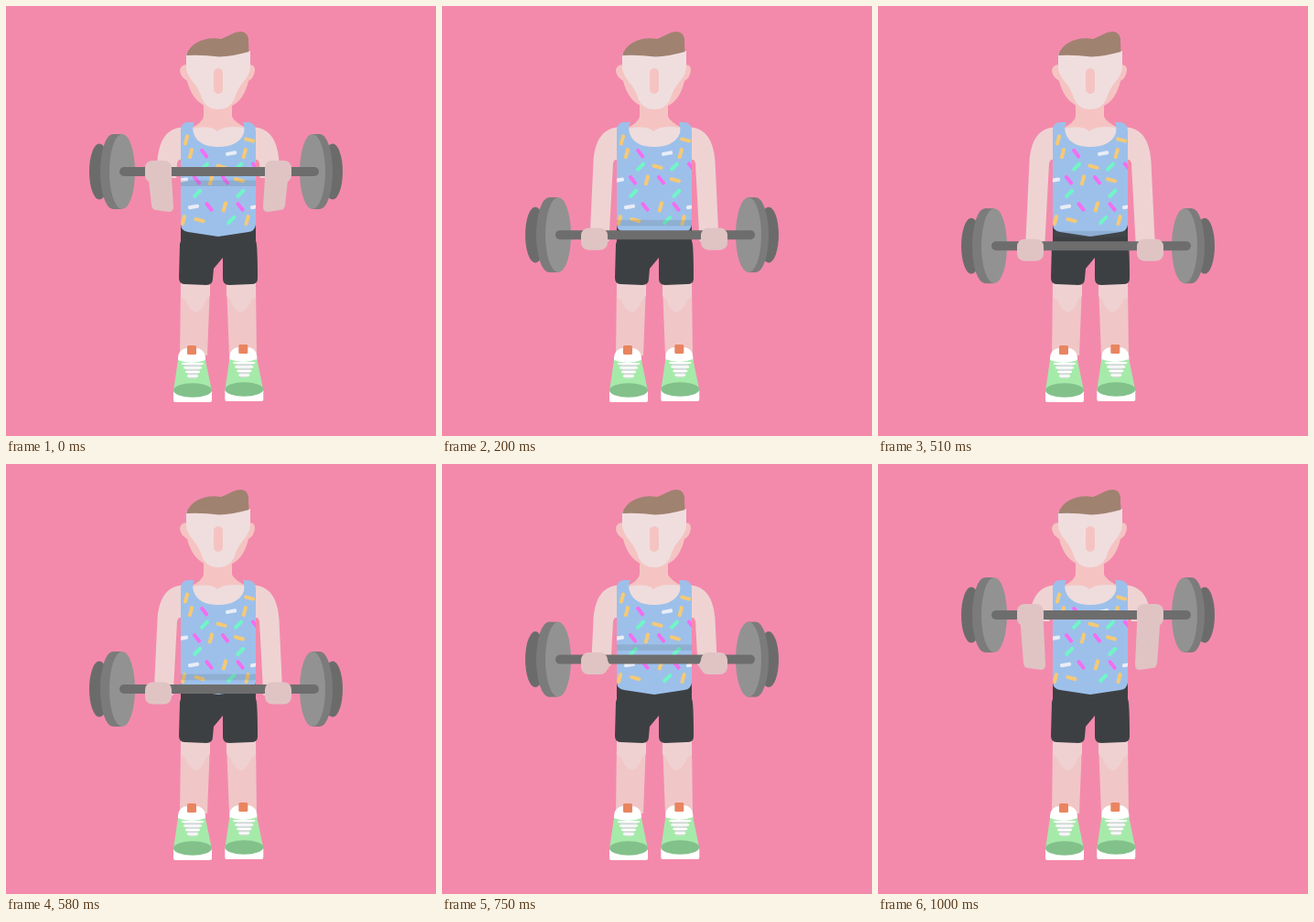
An HTML page for the animation above (1070 ms loop, 470 by 470 pixels).

```html
<!DOCTYPE html>
<html lang="en">
<head>
<meta charset="utf-8">
<title>Barbell curl</title>
<style>
html, body { margin: 0; width: 100%; height: 100%; overflow: hidden; background: #f38aac; }
svg { display: block; width: 100%; height: 100%; }
.mirror { transform: translateX(464px) scaleX(-1); }
</style>
</head>
<body>
<svg viewBox="0 0 470 470">
  <defs>
    <path id="shirt" d="M191 135Q192 127 199 127H206Q203 132 205 139Q210 154 232 154T260 139Q261 132 259 127H265Q273 128 273 137V239Q272 246 265 247L232 252L199 247Q191 246 191 238Z"/>
    <clipPath id="shirtClip"><use href="#shirt"/></clipPath>
    <clipPath id="armClip"><rect id="armRect" x="140" y="120" width="60"/></clipPath>
    <path id="upperArm" clip-path="url(#armClip)" fill="#efd3d3" d="M194 132.500C175 133 167 148 165.500 170L161 266H182L187 172Q188 168 190 168H194Z"/>
    <g id="grip">
      <path id="wrist" fill="#efd3d3" d="M161.500 260H182V276H155Q155 266 161 264Z"/>
      <path id="forearm" fill="#e0c4c4"/>
      <rect id="hand" fill="#e0c4c4"/>
    </g>
    <g id="leg">
      <path fill="#f1c6c7" d="M191 304H223L220 382H190Z"/>
      <path fill="#efd1d2" d="M191 302H223V317Q218 320 216 328Q207 342 198 326Q196 320 191 318Z"/>
    </g>
    <g id="shoe">
      <rect x="188" y="374" width="30" height="24" rx="10" fill="#fff"/>
      <rect x="198" y="371" width="10" height="10" rx="1.500" fill="#e88560"/>
      <path fill="#a6eaaa" d="M188 387Q203 393 218 387L225 421H183Z"/>
      <path fill="#d7dedb" d="M194 390H214L208 407H200Z"/>
      <g id="laces" stroke="#fff" stroke-width="2.200" stroke-linecap="round"></g>
      <rect x="183" y="420" width="42" height="13" rx="2" fill="#fff"/>
      <ellipse cx="204" cy="420" rx="21" ry="7.800" fill="#83c18b"/>
    </g>
    <path id="sparks" fill="none" stroke="#6bffc5" stroke-width="6" stroke-linecap="round" d="M133 147L152 164.500M130 168L149.500 174.500M136 186L149 184.500"/>
  </defs>

  <rect width="470" height="470" fill="#f38aac"/>
  <use href="#leg"/>
  <use href="#leg" class="mirror"/>
  <use href="#shoe"/>
  <use href="#shoe" x="56.300" y="-1"/>
  <path fill="#3d4043" d="M191 238H273V257Q275 259 275 298Q275 304 268 304L244 305Q237 305 237 298V275L227 287L226 298Q226 305 219 305L195 304Q189 304 189 297L190 260L191 257Z"/>
  <use href="#upperArm"/>
  <use href="#upperArm" class="mirror"/>

  <g id="head">
    <path fill="#f5c4c2" d="M216 98H247V121Q250 127 262 133L255 150H210L203 133Q214 128 216 121Z"/>
    <path fill="#efdcdd" d="M203 134Q224 130 231 137Q239 130 261 133V156H203Z"/>
    <path fill="#f5c4c2" d="M198 52H266V64Q272 64 272 70Q271 79 265 82Q260 103 247 109H217Q203 102 198 82Q190 77 190 70Q191 64 198 64Z"/>
    <path fill="#f0dedf" d="M197 52L267 49V66C267 78 256 84 251 97Q247 113 232 113T213 97C208 84 197 78 197 66Z"/>
    <rect x="227" y="68" width="10" height="28" rx="5" fill="#f5c4c2"/>
    <path fill="#a08270" d="M197 54C202 39 219 33 235 36C244 33 248 28 258 28Q266 30 265 40L265.500 50Q247 55 233 55.500Q215 53 197 54Z"/>
  </g>

  <use href="#shirt" fill="#9dc0ea"/>
  <g id="sprinkles" clip-path="url(#shirtClip)"></g>
  <rect id="shadow" x="191" width="82" height="6.500" fill="#4a5866" opacity=".18"/>

  <g id="glow">
    <use href="#sparks"/>
    <use href="#sparks" transform="translate(462.500 0) scale(-1 1)"/>
  </g>
  <g id="barbell">
    <g id="plates"></g>
    <rect x="124" y="-5" width="218" height="10" rx="5" fill="#6e6d6d"/>
  </g>
  <use href="#grip"/>
  <use href="#grip" class="mirror"/>
</svg>
<script>
const $ = id => document.getElementById(id);

function set(node, attrs) {
  for (const [name, value] of Object.entries(attrs)) node.setAttribute(name, value);
}

function add(parent, tag, attrs) {
  const node = document.createElementNS("http://www.w3.org/2000/svg", tag);
  set(node, attrs);
  parent.appendChild(node);
}

const show = (node, on) => node.setAttribute("visibility", on ? "visible" : "hidden");

for (let i = 0; i < 4; i++) {
  const half = 11 - 2 * i, y = 391 + 4.5 * i;
  add($("laces"), "path", { d: `M${204 - half} ${y}h${2 * half}` });
}

// Five slots per row (orange, pink, white, mint or empty), then first x and spacing
const sprinkleRows = [
  ["o...o", 197, 17.3], ["op.wo", 202, 14.7], [".momp", 198.5, 18.5], ["wpopo", 193, 15.5],
  [".m..m", 193.5, 15.7], ["wpopw", 205, 17], ["oo.mo", 194, 17.4]
];
const colors = { o: "#f6c974", p: "#f36df2", w: "#e9edf6", m: "#70f6c6" };
const tilts = { p: 52, w: -10, m: -45 };
let oranges = 0;
const orangeTilt = () => [1, 4].includes(oranges++ % 5) ? 15 : 105;

sprinkleRows.forEach(([slots, left, gap], row) => {
  [...slots].forEach((kind, col) => {
    if (kind === ".") return;
    const x = left + gap * col, y = 146.5 + 14.6 * row;
    add($("sprinkles"), "rect", {
      x: -6, y: -2, width: 12, height: 4, rx: 1.5, fill: colors[kind],
      transform: `translate(${x} ${y}) rotate(${tilts[kind] ?? orangeTilt()})`
    });
  });
});

function plate(x, rx, ry, fill, depth = 0) {
  add($("plates"), "rect", { x: Math.min(x, x + depth), y: -ry, width: Math.abs(depth), height: 2 * ry, fill });
  add($("plates"), "ellipse", { cx: x, rx, ry, fill });
}
for (const side of [-1, 1]) {
  plate(229.5 + 127.5 * side, 11, 30.5, "#6c6b6b");
  plate(230 + 113 * side, 14, 41, "#7c7b7b", -9 * side);
  plate(231 + 104 * side, 14, 41, "#939292");
}

const LOOP = 1070, TOP = 165, BOTTOM = 277.5, LIFT = 16.2;

// Lowering slows down in 50 ms steps, lifting is linear in 70 ms steps
function barHeight(t) {
  if (t < 300) {
    const p = Math.floor(t / 50) / 6;
    return 181 + (BOTTOM - 181) * p * (1.225 - 0.225 * p);
  }
  if (t < 510) return BOTTOM;
  return Math.max(TOP, TOP + LIFT * (6 - Math.floor((t - 510) / 70)));
}

function sparksVisible(t) {
  if (t < 650 || t >= 1000) return false;
  return t >= 860 || (t - 650) % 70 < 30;
}

function draw(t) {
  const y = barHeight(t);
  const raised = y < 205, lowest = y > 272;
  $("barbell").setAttribute("transform", `translate(0 ${y})`);
  $("armRect").setAttribute("height", y + 7 - 120);
  $("shadow").setAttribute("y", raised ? 190.5 : y - 16.3);
  show($("shadow"), y > 172 && y < 268);
  set($("hand"), lowest
    ? { x: 150.5, y: y - 4, width: 29.5, height: 15, rx: 7 }
    : { x: 152, y: y - (raised ? 12 : 7.5), width: 29, height: 24, rx: 8 });
  show($("wrist"), lowest);
  $("forearm").setAttribute("d", `M155 ${y}H180.500L183 219Q183 225 178 225L164 223Q160 223 159 218Z`);
  show($("forearm"), y < 215);
  show($("glow"), sparksVisible(t));
}

const start = performance.now();
function tick() {
  draw((performance.now() - start) % LOOP);
  requestAnimationFrame(tick);
}
tick();
</script>
</body>
</html>
```
